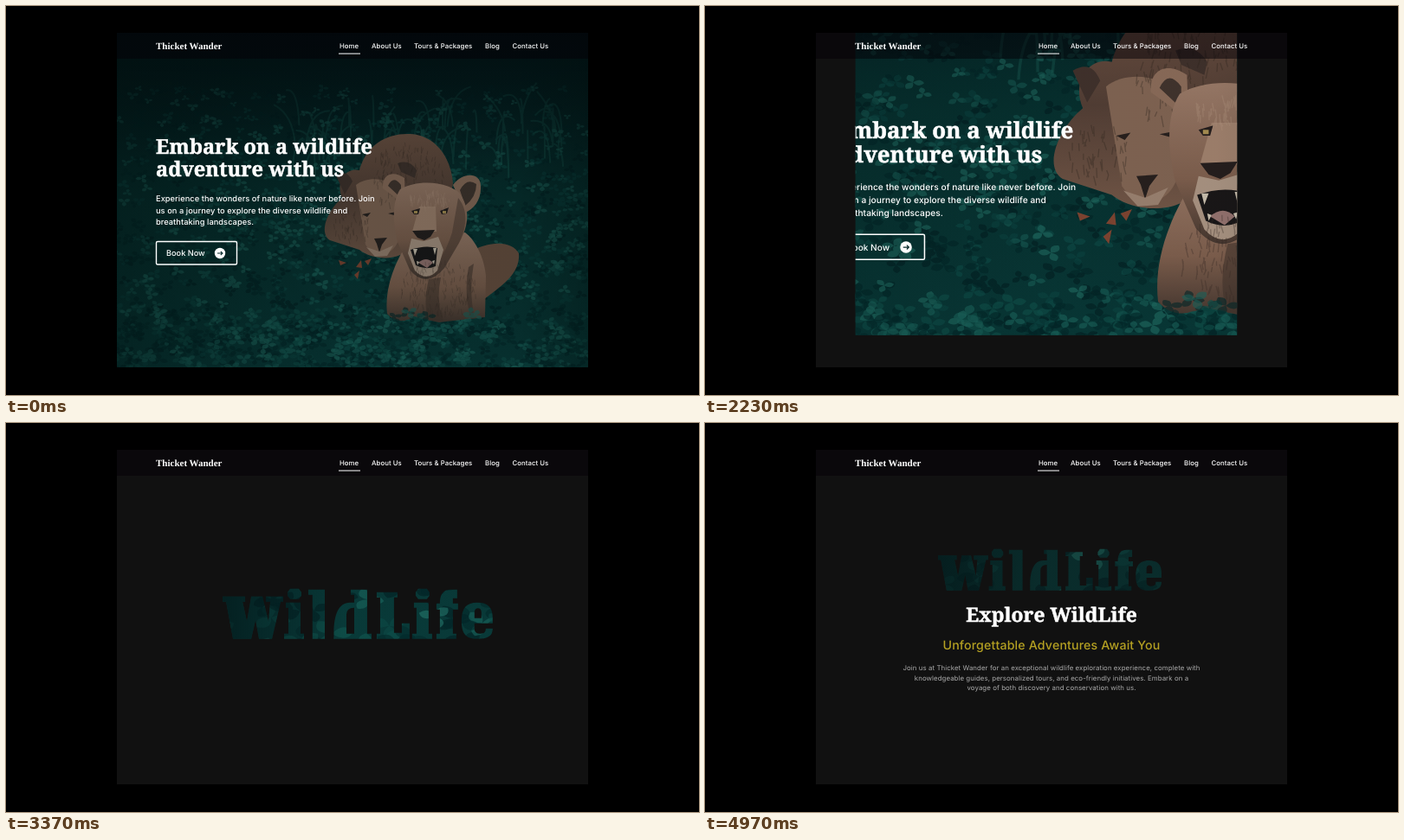
Animation of 800 by 450 pixels, one loop 5000 ms. Source, as an HTML page:

```html
<!DOCTYPE html>
<html lang="en">
<head>
<meta charset="utf-8">
<title>Wildlife landing page</title>
<style>
  html, body { margin: 0; width: 100%; height: 100%; overflow: hidden; background: #000; }
  svg { display: block; width: 100vw; height: 100vh; }
  text { font-family: Inter, "Open Sans", sans-serif; fill: #fff; text-rendering: geometricPrecision; white-space: pre; }
  .slab text { font-family: "Noto Serif", "Liberation Serif", serif; font-weight: 700; stroke: #fff; stroke-width: .5; }
  .logo { font: 700 11px "Liberation Serif", serif; }
  .nav text { font-size: 7.8px; font-weight: 500; letter-spacing: .04px; }
  .lead { font-size: 9.3px; font-weight: 500; letter-spacing: .03px; }
  .sub { font-size: 14.2px; font-weight: 500; letter-spacing: .15px; fill: #b5a122; }
  .copy text { font-size: 7.85px; letter-spacing: .07px; fill: #aaa; }
  .mid text { text-anchor: middle; }
</style>
</head>
<body>
<svg viewBox="0 0 800 450" xmlns="http://www.w3.org/2000/svg">
  <defs>
    <clipPath id="card"><rect x="128" y="31" width="544" height="387"/></clipPath>
    <clipPath id="word"><path id="letters" clip-rule="evenodd"/></clipPath>
    <linearGradient id="ground" x1="0" y1="0" x2="0" y2="1">
      <stop offset="0" stop-color="#031618"/>
      <stop offset=".2" stop-color="#052426"/>
      <stop offset=".5" stop-color="#083836"/>
      <stop offset="1" stop-color="#093d3c"/>
    </linearGradient>
    <linearGradient id="dusk" x1="0" y1="0" x2="0" y2="1">
      <stop offset="0" stop-color="#020e11" stop-opacity=".8"/>
      <stop offset=".4" stop-color="#020e11" stop-opacity=".15"/>
      <stop offset="1" stop-color="#020e11" stop-opacity="0"/>
    </linearGradient>
    <linearGradient id="veilFill">
      <stop offset="0" stop-color="#01100f" stop-opacity=".55"/>
      <stop offset=".5" stop-color="#01100f" stop-opacity=".28"/>
      <stop offset=".85" stop-color="#01100f" stop-opacity=".3"/>
      <stop offset="1" stop-color="#01100f" stop-opacity=".5"/>
    </linearGradient>
    <linearGradient id="shadeFill">
      <stop offset="0" stop-color="#021416" stop-opacity=".75"/>
      <stop offset="1" stop-color="#021416" stop-opacity="0"/>
    </linearGradient>
    <linearGradient id="fur" x1="0" y1="0" x2="0" y2="1">
      <stop offset="0" stop-color="#a98470"/>
      <stop offset=".6" stop-color="#8a6653"/>
      <stop offset="1" stop-color="#4c3a32"/>
    </linearGradient>
    <linearGradient id="furBack" x1="0" y1="0" x2="0" y2="1">
      <stop offset="0" stop-color="#775646"/>
      <stop offset=".5" stop-color="#5a4238"/>
      <stop offset="1" stop-color="#7d5d4c"/>
    </linearGradient>
  </defs>

  <g clip-path="url(#card)">
    <rect x="128" y="31" width="544" height="387" fill="#111"/>
    <g id="hero">
      <g id="photo">
        <rect x="128" y="31" width="544" height="390" fill="url(#ground)"/>
        <g id="backLeaves"></g>
        <rect x="128" y="31" width="544" height="390" fill="url(#dusk)"/>
        <g id="rearLion">
          <path fill="url(#furBack)" d="M408 190C416 160 440 147 466 148C496 149 514 176 516 205L505 275L455 288C442 294 420 292 408 282L374 271C360 262 372 235 388 222C380 204 392 186 408 190Z"/>
          <path fill="#46342e" d="M452 182Q466 177 474 190L472 199L456 192ZM381 196Q394 188 400 203L391 218Z"/>
          <path fill="#8d6c59" d="M404 207C416 197 440 198 451 210L455 262C452 290 426 294 415 276Z"/>
          <path fill="#2b211f" d="M411 241L421 239L417 244ZM441 240L451 238L448 242ZM425 269L440 268L434 276L431 285L428 275Z"/>
          <path fill="#a98c79" d="M416 279L431 284L447 277L440 289L426 290Z"/>
        </g>
        <g id="frontLion">
          <path fill="#765645" d="M532 286C560 270 584 272 592 286C594 310 572 324 548 342Z"/>
          <path fill="url(#fur)" d="M466 270C446 300 437 330 440 356Q452 370 472 360L500 366L553 360L554 312C552 290 541 270 530 262Z"/>
          <path fill="#4a372f" opacity=".6" d="M488 316Q481 345 488 364L505 364Q496 342 502 314ZM534 302Q528 332 537 362L541 362Q534 330 540 298Z"/>
          <path fill="#987460" d="M435 211C434 194 447 190 460 199L461 230ZM516 207C528 191 548 193 548 208C549 224 540 235 530 239Z"/>
          <path fill="#483730" d="M441 208Q447 195 456 207L456 222ZM524 213Q532 198 543 206Q543 221 530 231Z"/>
          <path fill="url(#fur)" d="M455 212C473 201 506 202 522 215C536 231 535 254 523 274L506 303Q485 328 466 305L452 273C446 249 446 226 455 212Z"/>
          <path fill="#5b4339" opacity=".6" d="M522 222C534 236 532 256 523 274L506 303Q496 314 487 315Q507 288 515 262Z"/>
          <path fill="#b08c76" d="M477 232L496 232L497 261L469 261Z"/>
          <path fill="#baa08d" d="M468 269L482 272L499 267L505 282L498 306Q485 320 472 306L464 286Z"/>
          <path fill="#291f1e" d="M468 237L478 234L476 241L471 241ZM501 237L511 233L509 240L503 241ZM469 260L495 259L490 267L483 271L475 268Z"/>
          <path fill="#b89a58" d="M471 237h4v3h-4zM504 237h4v3h-4z"/>
          <path fill="#1c1718" d="M467 282Q484 276 498 280L496 301Q485 306 473 300Z"/>
          <path fill="#a37c78" d="M476 297Q485 289 493 297L486 303Z"/>
          <path fill="#ddd0bd" d="M470 281L475 281L472 289ZM493 280L497 280L495 288ZM474 295L477 296L475 300ZM492 295L495 294L494 299Z"/>
        </g>
        <g id="frontLeaves"></g>
        <path fill="#8b4934" d="M384 294L393 297L386 300ZM404 302L410 294L411 303ZM402 311L408 306L406 316ZM414 295L422 292L418 300Z"/>
      </g>
      <rect id="veil" x="128" y="31" width="544" height="387" fill="url(#veilFill)"/>
      <rect id="shade" x="235" y="31" width="155" height="387" fill="url(#shadeFill)"/>
      <g id="pitch">
        <g class="slab" font-size="23.6">
          <text x="173" y="171">Embark on a wildlife</text>
          <text x="173" y="196.5">adventure with us</text>
        </g>
        <text class="lead" x="173" y="226.2">Experience the wonders of nature like never before. Join</text>
        <text class="lead" x="173" y="239.8">us on a journey to explore the diverse wildlife and</text>
        <text class="lead" x="173" y="253.4">breathtaking landscapes.</text>
        <rect x="173.5" y="272.5" width="93" height="26.5" rx="1.5" fill="none" stroke="#fff" stroke-width="1.4"/>
        <text x="185" y="289.2" font-size="9.2" font-weight="500">Book Now</text>
        <circle cx="247" cy="286" r="6.2" fill="#fff"/>
        <path d="M244 286H250M247.8 283.8L250 286L247.8 288.2" fill="none" stroke="#06292a" stroke-width="1.1"/>
      </g>
    </g>
    <g class="mid">
      <g id="title" class="slab"><text x="400" y="230" font-size="22.8">Explore WildLife</text></g>
      <g id="subtitle"><text class="sub" x="400" y="262">Unforgettable Adventures Await You</text></g>
      <g id="copy" class="copy">
        <text x="400" y="286.2">Join us at Thicket Wander for an exceptional wildlife exploration experience, complete with</text>
        <text x="400" y="297.7">knowledgeable guides, personalized tours, and eco-friendly initiatives. Embark on a</text>
        <text x="400" y="309.2">voyage of both discovery and conservation with us.</text>
      </g>
    </g>
    <rect x="128" y="31" width="544" height="30" fill="#040106" opacity=".5"/>
    <text class="logo" x="173" y="50">Thicket Wander</text>
    <g class="nav">
      <text x="385" y="49">Home</text>
      <text x="422" y="49">About Us</text>
      <text x="471" y="49">Tours &amp; Packages</text>
      <text x="553" y="49">Blog</text>
      <text x="584.5" y="49">Contact Us</text>
      <rect x="384" y="54.6" width="25" height="1" fill="#fff"/>
    </g>
  </g>
</svg>
<script>
const $ = id => document.getElementById(id);
const LOOP = 5000;

// Seeded foliage and fur, merged into one path per tone.
let seed = 11;
const rnd = () => (seed = (seed * 16807) % 2147483647) / 2147483647;
const between = (a, b) => a + rnd() * (b - a);

function addPath(parent, attrs) {
  const path = document.createElementNS('http://www.w3.org/2000/svg', 'path');
  for (const name in attrs) path.setAttribute(name, attrs[name]);
  parent.appendChild(path);
}

function leaf(x, y, r, angle) {
  const point = (a, d) => (x + Math.cos(a) * d).toFixed(1) + ' ' + (y + Math.sin(a) * d * .7).toFixed(1);
  return `M${point(angle, 0)}Q${point(angle - .85, r)} ${point(angle, r * 1.1)}Q${point(angle + .85, r)} ${point(angle, 0)}Z`;
}

function clover(x, y, r) {
  const turn = between(0, 6.28);
  return [0, 2.1, 4.2].map(a => leaf(x, y, r, turn + a)).join('');
}

function foliage(id, tones, count, top, bottom) {
  for (const fill of tones) {
    let d = '';
    for (let i = 0; i < count; i++) {
      const y = between(top, bottom);
      d += clover(between(128, 672), y, between(3, 6) + y / 110);
    }
    addPath($(id), { d, fill, opacity: .6 });
  }
}

function fur(id, stroke, count, cx, cy, rx, ry) {
  let d = '';
  for (let i = 0; i < count; i++) {
    const a = between(0, 6.28), r = Math.sqrt(rnd());
    d += `M${cx + Math.cos(a) * r * rx} ${cy + Math.sin(a) * r * ry}l${between(-2, 2)} ${between(3, 8)}`;
  }
  addPath($(id), { d, stroke, fill: 'none', 'stroke-width': .8, opacity: .35 });
}

foliage('backLeaves', ['#022123', '#0f5550', '#032a2c', '#1b6a61', '#02292b', '#0c4b48', '#257a6f'], 170, 95, 420);
let blades = '';
for (let i = 0; i < 75; i++) {
  const x = between(330, 650), y = between(135, 205), lean = between(-28, 28);
  blades += `M${x} ${y}q${lean * .1} ${-between(25, 50)} ${lean} ${-between(22, 48)}`;
}
addPath($('backLeaves'), { d: blades, fill: 'none', stroke: '#1d6a61', 'stroke-width': 2, opacity: .45 });
fur('rearLion', '#33251f', 150, 462, 195, 42, 38);
fur('rearLion', '#33251f', 50, 400, 252, 22, 20);
fur('frontLion', '#3d2c25', 160, 500, 325, 45, 32);
fur('frontLion', '#c3a08a', 60, 488, 222, 24, 10);
foliage('frontLeaves', ['#042c2e', '#115851', '#02282a', '#1d6c63'], 65, 354, 420);

// Letter outlines of the cut-out word.
const dotlessI = x => `M${x} 208h17v36h4v6h-23v-6h5v-30h-3z`;
const letterI = x => `M${x + 5} 192h10l3 4v4l-3 4h-10l-3-4v-4z` + dotlessI(x);
$('letters').setAttribute('d', [
  'M250 201H276V207H273L278 230L283 201H296L303 230L305 207H300V201H320V207H317L307 250H292L288 228L283 250H262L254 207H250Z',
  letterI(323),
  'M349 193H368V250H353.8V199H349Z',
  'M378.5 250V243C378.5 222 384 208 397 208H402V199H398V193H417V244H422V250ZM393 244V222Q393 214 402 214V244Z',
  'M428 196H452V202H448V243H457V232H466V250H428V244H432V202H428Z',
  letterI(471),
  'M497 250V244H501V216H497V209H501C501 197 506 193 513 193H521V203H516V209H522V216H516V244H520V250Z',
  'M526 229C526 214 532 208 544 208C557 208 562 214 562 226V232H541V238C541 243 544 244 548 244C553 244 554 241 554 238H562C562 247 556 250 544 250C531 250 526 244 526 229ZM541 226H549V219C549 213 541 213 541 219Z'
].join(''));

// Smooth monotone interpolation through [time, value] pairs.
function track(...keys) {
  const slope = i => (keys[i + 1][1] - keys[i][1]) / (keys[i + 1][0] - keys[i][0]);
  const tangent = i => {
    if (i === 0 || i === keys.length - 1) return 0;
    const a = slope(i - 1), b = slope(i);
    return a * b > 0 ? 2 * a * b / (a + b) : 0;
  };
  return t => {
    if (t <= keys[0][0]) return keys[0][1];
    const i = keys.findIndex(key => key[0] > t) - 1;
    if (i < 0) return keys[keys.length - 1][1];
    const [t0, v0] = keys[i], [t1, v1] = keys[i + 1];
    const span = t1 - t0, u = (t - t0) / span, w = 1 - u;
    return v0 * w * w * (1 + 2 * u) + v1 * u * u * (3 - 2 * u)
      + span * u * w * (w * tangent(i) - u * tangent(i + 1));
  };
}

const wordScale = track([1950, 46], [2130, 36], [2600, 15], [2900, 6.5], [3200, 1.6], [3370, 1], [3700, .827]);
const wordY = track([2130, 195], [2600, 244], [3370, 244], [3600, 222], [3900, 199], [4230, 191], [4970, 189]);
const photoScale = track([1850, 1], [2600, 2.4], [3300, 2.6]);
const photoShift = track([2600, 0], [3300, -80]);
const photoFade = track([3370, 1], [4230, .72]);
const pitchScale = track([1850, 1], [2600, 1.26], [3200, 1.5]);
const pitchShift = track([1850, 0], [2600, -44], [3200, -260]);
const pitchFade = track([2650, 1], [3000, 0]);
const veilFade = track([1900, 1], [2500, 0]);
const shadeFade = track([2800, 0], [3300, 1]);
const copyShift = track([3450, 46], [3800, 20], [4230, 5], [4970, 0]);
const copyFade = track([3400, 0], [3800, .6], [4230, .94], [4700, 1]);

const zoom = (x, y, s, dy = 0) => `translate(${x} ${y + dy}) scale(${s}) translate(${-x} ${-y})`;
const set = (id, name, value) => $(id).setAttribute(name, value);

function render(t) {
  if (t < 1950) $('hero').removeAttribute('clip-path');
  else set('hero', 'clip-path', 'url(#word)');
  set('letters', 'transform', `translate(359.8 ${wordY(t)}) scale(${wordScale(t)}) translate(-359.8 -244.2)`);
  set('photo', 'transform', zoom(316, 377, photoScale(t), photoShift(t)));
  set('photo', 'opacity', photoFade(t));
  set('pitch', 'transform', zoom(400, 225, pitchScale(t), pitchShift(t)));
  set('pitch', 'opacity', pitchFade(t));
  set('veil', 'opacity', veilFade(t));
  set('shade', 'opacity', shadeFade(t));
  [['title', 1], ['subtitle', 1.1], ['copy', 1.25]].forEach(([id, pace]) => {
    set(id, 'transform', `translate(0 ${copyShift(t) * pace})`);
    set(id, 'opacity', copyFade(t));
  });
}

const start = performance.now();
function tick() {
  render((performance.now() - start) % LOOP);
  requestAnimationFrame(tick);
}
tick();
</script>
</body>
</html>
```
